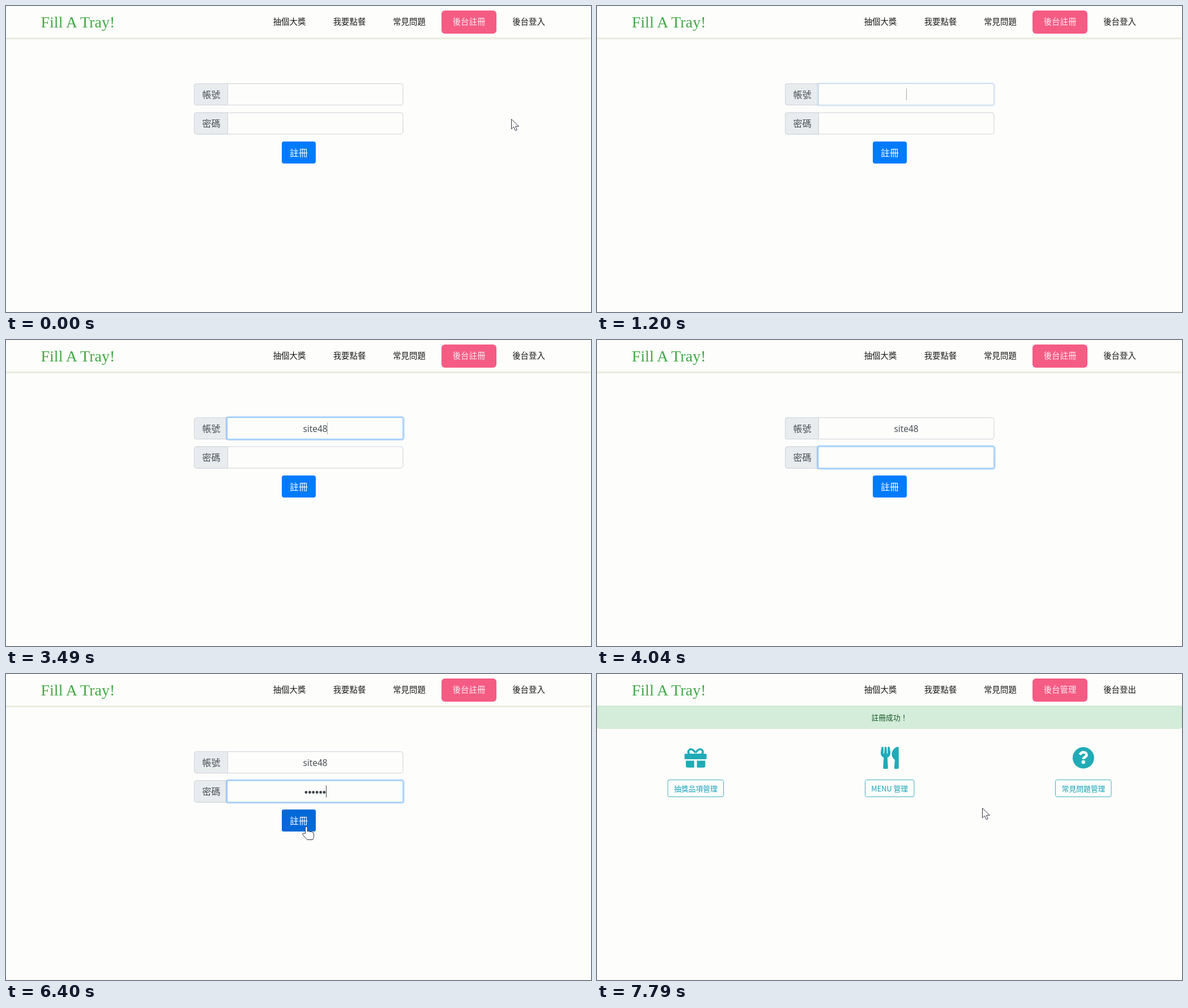
Recreate the animation shown at these times as an HTML page. Size 1033x542 px, loop 8 s.

```html
<!DOCTYPE html>
<html lang="zh-Hant">
<head>
<meta charset="utf-8">
<title>註冊</title>
<style>
  html, body { margin: 0; width: 100%; height: 100%; overflow: hidden; background: #fdfdfb; }
  svg { display: block; width: 1033px; height: 542px; }
  text { font-family: "Noto Sans CJK TC", "Noto Sans CJK", "Noto Sans", sans-serif; font-weight: 300; text-anchor: middle; }
  .brand { font: 28px "Liberation Serif", serif; text-anchor: start; fill: #43a847; }
  .nav text { font-size: 14.4px; fill: #1c1c1c; }
  .nav .active { fill: #fdeaf0; }
  .label { font-size: 16px; fill: #495057; }
  .submit { font-size: 16px; font-weight: 400; fill: #fff; }
  .box { fill: none; stroke: #ced4da; }
  .prefix { fill: #e9ecef; stroke: #ced4da; }
  .ring { fill: none; stroke: #007bff; stroke-opacity: .25; stroke-width: 2.6; }
  .edge { fill: #fdfdfb; stroke: #80bdff; }
  .value { font: 15.4px "Noto Sans", "Open Sans", sans-serif; fill: #495057; }
  .dots { font: 18px "Liberation Sans", sans-serif; letter-spacing: .1px; fill: #40464c; }
  .small text { font-size: 12.8px; fill: #17a2b8; }
  .small rect { fill: none; stroke: #45aebf; }
  .icon { fill: #20abb7; }
  .cursor path { fill: #fff; stroke: #34344a; stroke-linejoin: round; }
</style>
</head>
<body>
<svg viewBox="0 0 1033 542">
  <rect width="1033" height="542" fill="#fdfdfb"/>
  <rect y="58" width="1032" height="2" fill="#f5f5f0"/>
  <rect y="56.5" width="1032" height="1" fill="#d3d8b4"/>
  <text class="brand" x="61.5" y="37.5">Fill A Tray!</text>
  <g class="nav">
    <rect x="769" y="8" width="97" height="41" rx="6" fill="#f55c84"/>
    <text x="500.5" y="33">抽個大獎</text>
    <text x="606.5" y="33">我要點餐</text>
    <text x="712" y="33">常見問題</text>
    <text x="817.5" y="33" class="active" id="admin"></text>
    <text x="923" y="33" id="session"></text>
  </g>

  <g id="form">
    <g id="account">
      <rect class="box" x="332.5" y="137.5" width="368.5" height="38" rx="4"/>
      <path class="prefix" d="M391.5 137.5h-55a4 4 0 0 0-4 4v30a4 4 0 0 0 4 4h55z"/>
      <text class="label" x="362.5" y="162.5">帳號</text>
      <g class="focus">
        <rect class="ring" x="389" y="136" width="313.5" height="41" rx="4"/>
        <rect class="edge" x="390.5" y="137.5" width="310.5" height="38" rx="2"/>
      </g>
      <text class="value" x="546" y="162.5"></text>
      <rect class="caret" y="146" width="1" height="21" fill="#a4a8ae"/>
    </g>
    <g id="password" transform="translate(0 51.5)">
      <rect class="box" x="332.5" y="137.5" width="368.5" height="38" rx="4"/>
      <path class="prefix" d="M391.5 137.5h-55a4 4 0 0 0-4 4v30a4 4 0 0 0 4 4h55z"/>
      <text class="label" x="362.5" y="162.5">密碼</text>
      <g class="focus">
        <rect class="ring" x="389" y="136" width="313.5" height="41" rx="4"/>
        <rect class="edge" x="390.5" y="137.5" width="310.5" height="38" rx="2"/>
      </g>
      <text class="value dots" x="546" y="164"></text>
      <rect class="caret" y="146" width="1" height="21" fill="#40464c"/>
    </g>
    <rect x="487" y="240" width="60" height="39" rx="4" fill="#007bff"/>
    <rect id="hover" x="487" y="240" width="60" height="39" rx="4" fill="#0069d9"/>
    <text class="submit" x="517" y="266">註冊</text>
  </g>

  <g id="panel">
    <rect x=".5" y="57" width="1032" height="39.5" rx="3" fill="#d4edda" stroke="#c3e6cb"/>
    <text x="516.5" y="82" font-size="12.8" fill="#155724">註冊成功！</text>
    <g class="icon">
      <g transform="translate(154.5 129) scale(.0764)">
        <path d="M256 136C205 70 180 56 152 56a64 64 0 0 0 0 128H360a64 64 0 0 0 0-128C332 56 307 70 256 136" fill="none" stroke="#20abb7" stroke-width="48"/>
        <rect y="160" width="512" height="128" rx="26"/>
        <path d="M32 320h192v160H64q-32 0-32-32zM288 320h192v128q0 32-32 32H288z"/>
      </g>
      <g transform="translate(501 129) scale(.0764)">
        <path d="M16 15C20-5 62-5 64 16V157q8 6 16 0L88 16c3-21 45-21 48 0l8 141q8 6 16 0V16c3-21 45-21 48-1q16 95 16 129c0 52-28 90-69 105l13 238q0 25-24 25H80q-24 0-24-25l13-238C28 234 0 196 0 144Q0 110 16 15z"/>
        <path d="M327 301l-15 185q0 26 24 26h56q24 0 24-24V24q0-24-24-24C309 0 171 179 327 301z"/>
      </g>
      <g transform="translate(839.3 129) scale(.0764)">
        <circle cx="256" cy="256" r="248"/>
        <path d="M176 182C194 148 220 126 258 126c40 0 72 24 72 62 0 54-74 48-74 98" fill="none" stroke="#fdfdfb" stroke-width="62"/>
        <circle cx="256" cy="352" r="42" fill="#fdfdfb"/>
      </g>
    </g>
    <g class="small">
      <rect x="125" y="187.5" width="98.5" height="30" rx="3"/>
      <text x="174.3" y="208">抽獎品項管理</text>
      <rect x="473.5" y="187.5" width="86.5" height="30" rx="3"/>
      <text x="516.7" y="208">MENU 管理</text>
      <rect x="809.5" y="187.5" width="98.5" height="30" rx="3"/>
      <text x="859" y="208">常見問題管理</text>
    </g>
  </g>

  <g class="cursor" id="cursor">
    <path id="arrow" d="M.5.5v17.5l4-4 2.8 6.7 3-1.3-2.8-6.2h6z"/>
    <path id="hand" d="M-1.5 12V1.5a1.8 1.8 0 0 1 3.6 0V8q4-1 4 1 4-1 4.5 1 3-.5 3 2v5q0 3-2 6H2Q-2 19-6 14q-1-3 2-2.5z"/>
  </g>
</svg>
<script>
  const LOOP = 8000, FADE = 150, BLINK = 530, SWITCH = 7550, HOVER = 6235;
  const $ = id => document.getElementById(id);

  const fields = [
    { el: $('account'), text: 'site48', from: 1160, to: 3500,
      keys: [1870, 2110, 2200, 2490, 2920, 3220] },
    { el: $('password'), text: '••••••', from: 3510, to: 6550,
      keys: [4140, 4240, 4540, 4840, 5070, 5300] }
  ];

  // time, x, y
  const path = [
    [330, 892, 200], [550, 800, 262], [720, 690, 284], [900, 625, 250], [1110, 600, 160],
    [5780, 600, 160], [5950, 596, 215], [6120, 578, 262], [6250, 542, 278], [6400, 530, 270.5],
    [7060, 530, 270.5], [7130, 620, 275], [7210, 718, 266], [7350, 718, 266], [7790, 680, 237]
  ];

  const ramp = (t, start) => Math.min(1, Math.max(0, (t - start) / FADE));
  const show = (el, on) => el.setAttribute('visibility', on ? 'inherit' : 'hidden');
  const inside = ([x, y], l, t, r, b) => x >= l && x <= r && y >= t && y <= b;

  function pointAt(t) {
    const i = path.findIndex(k => k[0] > t);
    if (i === 0) return path[0].slice(1);
    if (i < 0) return path[path.length - 1].slice(1);
    const [a, b] = [path[i - 1], path[i]];
    const p = (t - a[0]) / (b[0] - a[0]);
    return [1, 2].map(n => a[n] + (b[n] - a[n]) * p);
  }

  function drawField({ el, text, from, to, keys }, t) {
    const part = name => el.querySelector('.' + name);
    const typed = keys.filter(k => k <= t).length;
    const value = part('value'), caret = part('caret');
    value.textContent = text.slice(0, typed);
    part('focus').setAttribute('opacity', ramp(t, from) - ramp(t, to));
    const last = typed ? keys[typed - 1] : from;
    show(caret, t >= from && t < to && (t - last) % (2 * BLINK) < BLINK);
    const width = typed ? value.getComputedTextLength() : 0;
    caret.setAttribute('x', Math.round(546 + width / 2 - .5));
  }

  function drawCursor(t, done) {
    const p = pointAt(t);
    const onButton = !done && inside(p, 487, 240, 547, 279);
    const onInput = !done && (inside(p, 391, 137, 701, 176) || inside(p, 391, 189, 701, 227));
    $('cursor').setAttribute('transform', `translate(${p})`);
    show($('hand'), onButton);
    show($('arrow'), !onButton && !onInput);
  }

  function render(t) {
    const done = t >= SWITCH;
    show($('form'), !done);
    show($('panel'), done);
    $('admin').textContent = done ? '後台管理' : '後台註冊';
    $('session').textContent = done ? '後台登出' : '後台登入';
    fields.forEach(f => drawField(f, t));
    $('hover').setAttribute('opacity', ramp(t, HOVER));
    drawCursor(t, done);
  }

  const start = performance.now();
  function tick() {
    render((performance.now() - start) % LOOP);
    requestAnimationFrame(tick);
  }
  tick();
</script>
</body>
</html>
```
